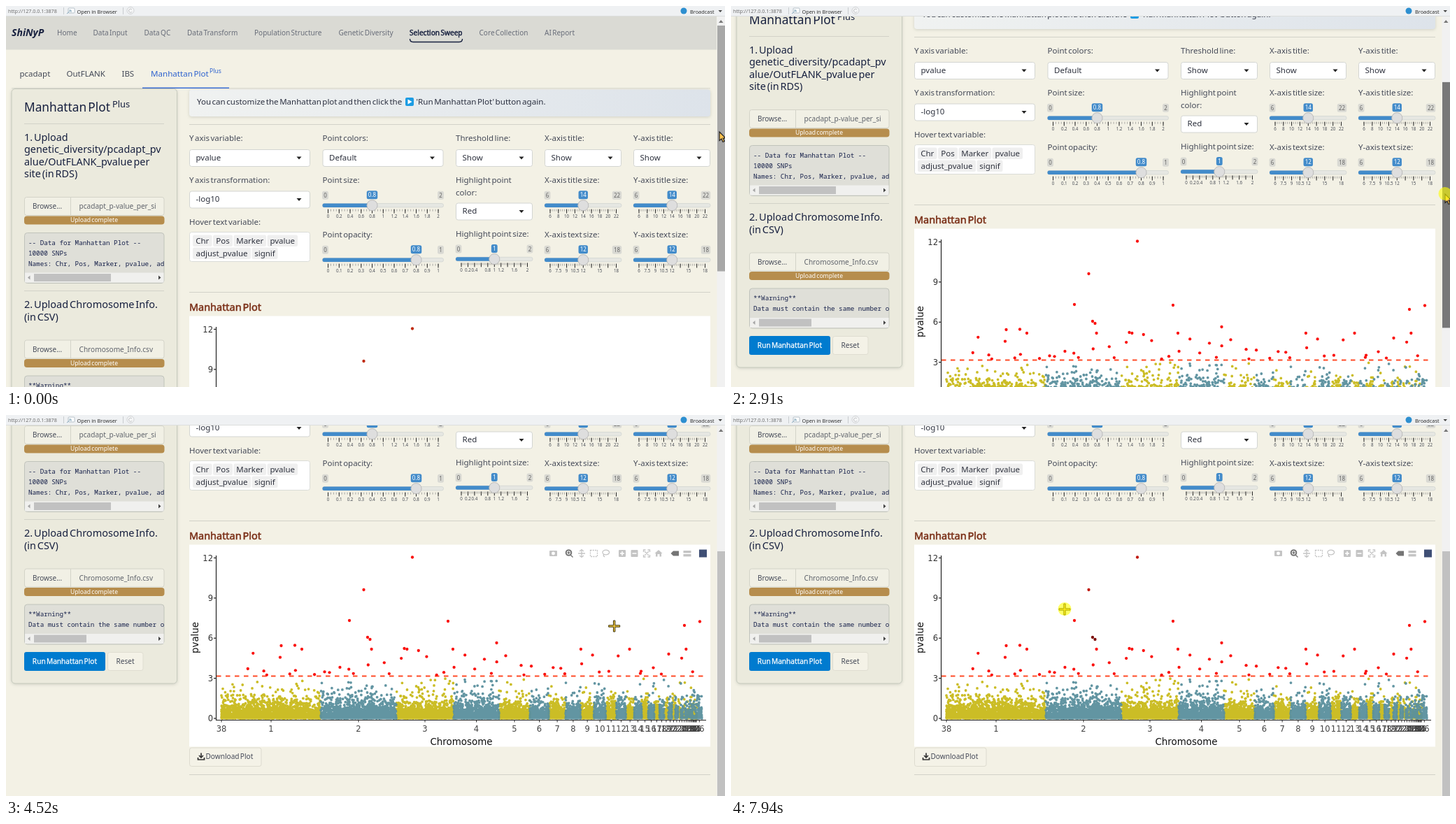
An HTML page that plays this animation: 1028 by 545 pixels, repeating every 8 s.

```html
<!DOCTYPE html>
<html lang="en">
<head>
<meta charset="utf-8">
<title>Manhattan Plot</title>
<style>
html, body { margin: 0; width: 100%; height: 100%; overflow: hidden; background: #f3f1e5; }
svg { display: block; }
text { font-family: "Noto Sans", sans-serif; word-spacing: -.13em; }
.mono { font-family: "Noto Sans Mono", monospace; word-spacing: 0; }
.plot { font-family: "DejaVu Sans", sans-serif; word-spacing: 0; }
.tip { font-family: "Liberation Sans", sans-serif; word-spacing: 0; }
.bar { font-family: "Open Sans", sans-serif; word-spacing: 0; }
.shadow { filter: drop-shadow(0 1px 2px rgba(70, 80, 70, .2)); }
</style>
</head>
<body>
<svg id="stage" width="1028" height="545" viewBox="0 0 1028 545"></svg>
<script>
const INK = '#454a58', DARK = '#17203f', BLUE = '#428bca', LINE = '#d2d2c8';
const YELLOW = '#c9ba1b', TEAL = '#5a909e';

const attrs = o => Object.entries(o).map(([k, v]) => ` ${k}="${v}"`).join('');
const text = (x, y, str, size = 11.5, fill = INK, more = {}) =>
  `<text${attrs({ x, y, 'font-size': size, fill, ...more })}>${str}</text>`;
const rect = (x, y, width, height, fill, more = {}) =>
  `<rect${attrs({ x, y, width, height, fill, ...more })}/>`;
const path = (d, stroke, width = 1, more = {}) =>
  `<path${attrs({ d, stroke, 'stroke-width': width, fill: 'none', ...more })}/>`;
const circle = (cx, cy, r, more = {}) => `<circle${attrs({ cx, cy, r, ...more })}/>`;
const shape = (d, fill) => `<path d="${d}" fill="${fill}"/>`;
const rule = (x1, x2, y, color = LINE) => path(`M${x1} ${y}H${x2}`, color);
const group = (content, more = {}) => `<g${attrs(more)}>${content}</g>`;
const heavy = (color, width) => ({ stroke: color, 'stroke-width': width });
const list = (n, fn) => Array.from({ length: n }, (_, i) => fn(i));
const MID = { 'text-anchor': 'middle' };

let seed = 7;
const random = () => (seed = seed * 16807 % 2147483647) / 2147483647;

function titleBar() {
  return rect(0, 0, 1028, 14.5, '#eff1f3') + rule(0, 1028, 14.5, '#dcdedd') +
    text(3, 10, 'http://127.0.0.1:3878', 7.2, '#666', { class: 'bar' }) +
    path('M82.5 2V12M167.5 2V12', '#c9cccf') +
    rect(89, 3, 9, 7, '#fff', { stroke: '#a5b3bd', 'stroke-width': .8, rx: 1 }) +
    path('M87 11L93 6M93 6H90M93 6V9', '#86a9bd') +
    text(101.5, 10.5, 'Open in Browser', 7.35, '#222', { class: 'bar' }) +
    circle(178, 6.5, 5, { fill: '#f5f6f7', stroke: '#d0d2d4' }) + path('M180 5A2.6 2.6 0 1 0 180.4 8', '#c2c4c6') +
    circle(969, 7, 4.5, { fill: '#2d8fd0' }) +
    text(978, 10.5, 'Broadcast', 7.4, '#222', { class: 'bar' }) +
    shape('M1018.5 6H1024L1021.2 9Z', '#444');
}

function navigation() {
  const items = [[73, 'Home'], [124.5, 'Data Input'], [197.5, 'Data QC'], [259, 'Data Transform'],
    [355, 'Population Structure'], [475.5, 'Genetic Diversity'], [676.5, 'Core Collection'], [770, 'AI Report']];
  return rect(0, 0, 1016, 62.5, '#dadad4') +
    text(8, 43, 'ShiNyP', 14, DARK, { 'font-weight': 700, 'font-style': 'italic' }) +
    items.map(([x, s]) => text(x, 41.5, s, 10.05, '#686d79')).join('') +
    text(577, 41.5, 'Selection Sweep', 10.15, DARK, heavy(DARK, .45)) +
    path('M577.5 47Q577.5 51.5 582 51.5H648Q652.5 51.5 652.5 47', DARK, 1.4) +
    rule(8, 1007, 117.8, '#d9d9d0') +
    text(19.5, 100.5, 'pcadapt') + text(86.5, 100.5, 'OutFLANK') + text(165.5, 100.5, 'IBS') +
    text(207, 100.5, 'Manhattan Plot', 11.6, '#2f63cf') + text(291, 96, 'Plus', 8.6, '#2f63cf') +
    path('M195 117.3H319', '#3a6fd8', 1.6);
}

function upload(y, file) {
  return rect(26.5, y, 199.5, 26, '#f1f0e5', { rx: 3, stroke: '#d3d3c8' }) +
    path(`M92.5 ${y}V${y + 26}`, '#d3d3c8') +
    text(38, y + 16.8, 'Browse...', 9.9) + text(104.5, y + 16.8, file, 10.1, '#60646c') +
    rect(26, y + 27, 200.5, 12, '#b68d4d', { rx: 4 }) +
    text(126, y + 35.7, 'Upload complete', 8.65, '#fff', MID);
}

function output(y, height, lines, thumb) {
  const bar = y + height - 15;
  return rect(26.5, y, 199.5, height, '#dfdfd8', { rx: 4, stroke: '#c0c3bb' }) +
    group(lines.map((s, i) => text(32, y + 17 + i * 15.2, s, 9.25, '#16204a', { class: 'mono' })).join(''),
      { 'clip-path': 'url(#side)' }) +
    rect(27, bar, 198.5, 14, '#f0f0ee') + rect(40, bar + 1.5, thumb, 11, '#c1c1c1') +
    shape(`M34.5 ${bar + 4}v6l-3.5 -3Z`, '#a5a5a5') + shape(`M218 ${bar + 4}v6l3.5 -3Z`, '#444');
}

function sidebar() {
  const title = ['1. Upload', 'genetic_diversity/pcadapt_pv', 'alue/OutFLANK_pvalue per', 'site (in RDS)'];
  return rect(8, 118.5, 236.5, 523.5, '#ebeadd', { rx: 5, stroke: '#c6c9bd', class: 'shadow' }) +
    text(26, 151, 'Manhattan Plot', 17.25, DARK) + text(152, 144.5, 'Plus', 12.9, DARK) +
    rule(26, 226, 168.5) +
    title.map((s, i) => text(26, 193 + i * 17.4, s, 14.4, DARK)).join('') +
    upload(273.5, 'pcadapt_p-value_per_si') +
    output(324.5, 72, ['-- Data for Manhattan Plot --', '10000 SNPs', 'Names: Chr, Pos, Marker, pvalue, adjust'], 110) +
    rule(26, 226, 407.5) +
    text(26, 432, '2. Upload Chromosome Info.', 14.5, DARK) + text(26, 449.5, '(in CSV)', 14.4, DARK) +
    upload(478, 'Chromosome_Info.csv') +
    output(529, 57, ['**Warning**', 'Data must contain the same number of'], 75) +
    rect(26, 597, 116, 27, '#007bcf', { rx: 3 }) +
    text(84, 614, 'Run Manhattan Plot', 10.15, '#fff', { ...MID, ...heavy('#fff', .25) }) +
    rect(145.5, 597.5, 50.5, 26, '#f4f2e7', { rx: 3, stroke: '#dfddd1' }) +
    text(170.5, 614, 'Reset', 10.1, INK, MID);
}

function select(x, y, width, value) {
  return rect(x + .5, y + .5, width - 1, 24, '#fff', { rx: 3, stroke: '#d3d5d2' }) +
    text(x + 9.5, y + 15.5, value, 11.5, '#2d313d') +
    shape(`M${x + width - 19.5} ${y + 10.5}h7l-3.5 4Z`, '#222');
}

function badge(center, y, str, fill, color) {
  const width = [...str].reduce((w, c) => w + (c === '.' ? 2.1 : 4.6), 4.2);
  return rect(center - width / 2, y, width, 12, fill, { rx: 2.5 }) + text(center, y + 9, str, 8, color, MID);
}

// y is the middle of the track; hidden lists labels the widget drops
function slider(x, y, width, min, max, value, steps, hidden = []) {
  const left = x + 8, span = width - 15.5;
  const at = v => left + span * (v - min) / (max - min);
  const ticks = (n, h) => list(n + 1, i => `M${(left + span * i / n).toFixed(1)} ${y + 5.5}v${h}`).join('');
  const labels = list(steps + 1, i => {
    const v = +(min + (max - min) * i / steps).toFixed(1);
    return hidden.includes(v) ? '' : text(at(v), y + 18, v, 6.2, '#4a4e57', MID);
  }).join('');
  return badge(x + 4, y - 20.5, String(min), '#d9d9d3', '#666') +
    badge(x + width - (max > 9 ? 6.5 : 4), y - 20.5, String(max), '#d9d9d3', '#666') +
    rect(x, y - 2.7, width, 5.4, '#e6e7e2', { rx: 2.5, stroke: '#cfd3d0', 'stroke-width': .7 }) +
    rect(x, y - 2.8, at(value) - x, 5.6, BLUE, { rx: 2.5 }) +
    path(ticks(steps * 4, 3), '#777', .6) + path(ticks(steps, 5.8), '#222') +
    labels + badge(at(value), y - 21, String(value), BLUE, '#fff') +
    circle(at(value), y, 7.6, { fill: '#dedede', stroke: '#b0b0b0', 'stroke-width': .8 });
}

function controls() {
  const chip = (x, y, width, s) => rect(x, y, width, 16.5, '#efefef', { rx: 2.5 }) +
    text(x + width / 2, y + 12.2, s, 11.5, '#2d313d', MID);
  const axis = (x, name) =>
    text(x, 193, name + '-axis title:') + select(x, 205, 110, 'Show') +
    text(x, 253, name + '-axis title size:') + slider(x, 285.2, 110, 6, 22, 14, 8) +
    text(x, 331, name + '-axis text size:') + slider(x, 363.2, 110, 6, 18, 12, 8, [13.5, 16.5]);
  return rect(262, 119.5, 745, 38.5, 'url(#info)', { rx: 4, class: 'shadow' }) +
    text(273, 141, 'You can customize the Manhattan plot and then click the', 11.55, '#2b3040') +
    rect(571, 131, 12, 12, '#1c9ce3', { rx: 2 }) + shape('M574.5 133.5V140.5L580.5 137Z', '#fff') +
    text(586.5, 141, "'Run Manhattan Plot' button again.", 11.65, '#2b3040') +
    rule(262, 1007, 169.5) +
    text(262, 193, 'Y axis variable:') + select(262, 205, 173, 'pvalue') +
    text(262, 253, 'Y axis transformation:') + select(262, 264.5, 173, '-log10') +
    text(262, 312.5, 'Hover text variable:') +
    rect(262.5, 323.5, 172, 42, '#fff', { rx: 3, stroke: '#dadcd8' }) +
    chip(267, 327.5, 27.5, 'Chr') + chip(296, 327.5, 28, 'Pos') + chip(325.5, 327.5, 46.5, 'Marker') +
    chip(373.5, 327.5, 43.5, 'pvalue') + chip(267, 345.5, 83, 'adjust_pvalue') + chip(351.5, 345.5, 37, 'signif') +
    text(452.5, 193, 'Point colors:') + select(452.5, 205, 173, 'Default') +
    text(452.5, 253, 'Point size:') + slider(452.5, 285.2, 173, 0, 2, .8, 10) +
    text(452.5, 331, 'Point opacity:') + slider(452.5, 363.2, 173, 0, 1, .8, 10) +
    text(643, 193, 'Threshold line:') + select(643, 205, 110, 'Show') +
    text(643, 253, 'Highlight point') + text(643, 270.5, 'color:') + select(643, 281.5, 110, 'Red') +
    text(643, 330, 'Highlight point size:') + slider(643, 362, 110, 0, 2, 1, 10, [.6, 1.4, 1.8]) +
    axis(770, 'X') + axis(897, 'Y') + rule(262, 1007, 409.5);
}

const valueY = v => 436 - 19.13 * v;

// Chromosome borders: the big ones, then a steady decay towards the right end
const EDGES = [308, 450, 558, 640, 705, 749];
while (EDGES.length < 36) EDGES.push(995 - (995 - EDGES.at(-1)) * .89);
EDGES.push(995);

function cloud() {
  const dots = ['', ''];
  for (let i = 0; i < 10000; i++) {
    const x = 308 + random() * 686.9;
    const v = Math.min(-Math.log10(random()), 3.1 - random() * .5);
    const chr = EDGES.findIndex(e => e > x) - 1;
    dots[chr % 2] += `M${x.toFixed(1)} ${valueY(v).toFixed(1)}h0`;
  }
  return [YELLOW, TEAL].map((c, i) =>
    path(dots[i], c, 3.8, { 'stroke-linecap': 'round', 'stroke-opacity': .95 })).join('');
}

// The tallest peaks stand out; the rest thin out above the threshold
function hits() {
  const peaks = [[581, 205.5], [511.5, 252], [517, 320], [520.5, 323], [491, 296], [632, 297],
    [970, 303], [992, 297.5], [701.5, 328], [393.5, 332], [413, 331.5], [569.5, 336]];
  const rest = list(54, i => [336 + 657 * (i + random()) / 54, Math.max(337, 374 + 14 * Math.log(random()))]);
  return [...peaks, ...rest].map(([x, y]) => circle(x, y, 2.15, { class: 'hit' })).join('');
}

function modebar() {
  const pale = '#c4c4c4', mid = '#757575', y = 198;
  const box = x => rect(x - 5, y - 5, 10, 10, pale, { rx: 1 });
  return rect(777, y - 4, 11, 8, pale, { rx: 1 }) + circle(782.5, y, 2.4, { fill: '#fff' }) +
    circle(804.5, y - 1, 3.8, { fill: '#fff', ...heavy(mid, 2) }) +
    path(`M807 ${y + 2}l3.5 3.5M802.5 ${y - 1}h4M804.5 ${y - 3}v4`, mid, 1.4) +
    path(`M818 ${y}h10M823 ${y - 5}v10M820 ${y - 3}l3-2.5l3 2.5M820 ${y + 3}l3 2.5l3-2.5`, pale, 1.3) +
    rect(835.5, y - 4.5, 10, 9, 'none', { stroke: pale, 'stroke-width': 1.3, 'stroke-dasharray': '2 1.3' }) +
    path(`M853 ${y - 1.5}a4.8 3.4 0 1 1 9.6 0a4.8 3.4 0 1 1 -9.6 0M855 ${y + 1}q-2 2 1 4`, pale, 1.3) +
    box(881) + path(`M878 ${y}h6M881 ${y - 3}v6`, '#fff', 1.5) + box(898.5) + path(`M895.5 ${y}h6`, '#fff', 1.5) +
    path(`M911.5 ${y - 2}v-3h3m3 0h3v3m0 4v3h-3m-3 0h-3v-3M913 ${y - 3}l6 6m0 -6l-6 6`, pale, 1.3) +
    shape(`M927.5 ${y}l5.5 -5l5.5 5h-1.5v4.5h-2.5v-3.5h-3v3.5h-2.5v-4.5Z`, pale) +
    shape(`M950.5 ${y}l3.5 -3.5h8v7h-8Z`, mid) +
    rect(968.5, y - 4, 11, 3.4, pale) + rect(968.5, y + 1, 11, 3.4, pale) +
    rect(991, y - 5.5, 11, 11, '#3f4f75');
}

function tooltip(x, y, top, lines) {
  return shape(`M${x} ${y}l6.5 -5v10Z`, '#f00') + rect(x + 6, top, 125.5, 76, '#f00') +
    lines.map((s, i) => text(x + 8, top + 10.6 + i * 12.25, s, 9.42, '#fff', { class: 'tip' })).join('');
}

function plot() {
  const yAxis = [0, 3, 6, 9, 12].map(v => path(`M297 ${valueY(v)}h3.5`, '#222', 1.2) +
    text(296, valueY(v) + 4.2, v, 11.5, '#333', { class: 'plot', 'text-anchor': 'end' })).join('');
  const middles = EDGES.slice(1).map((e, i) => (e + EDGES[i]) / 2);
  const names = [308, ...middles].map((x, i) => path(`M${x} 438.5v3`, '#222') +
    text(x, 455, i || 38, 11.5, '#444', { class: 'plot', ...MID })).join('');
  return text(262, 180, 'Manhattan Plot', 14.45, '#7b3018', heavy('#7b3018', .55)) +
    rect(262, 187.5, 745, 289, '#fff') + cloud() +
    path('M300.5 203V438.5H1001', '#222', 1.2) + yAxis + names +
    path('M301 375.5H1000', '#ff4a26', 1.8, { 'stroke-dasharray': '6.5 6.5' }) +
    group(hits(), { id: 'hits' }) +
    text(651, 474, 'Chromosome', 13.45, '#111', { class: 'plot', ...MID }) +
    text(0, 0, 'pvalue', 13.4, '#111', { class: 'plot', ...MID, transform: 'translate(275 320.5) rotate(-90)' }) +
    group(modebar(), { id: 'modebar', transform: 'translate(0 2)' }) +
    group(tooltip(581, 205.5, 187.5, ['Chr:\u00a0 3', 'Pos:\u00a0 30244672', 'Marker: 3:30244672', 'pvalue: 8.714356e-13',
      'adjust_pvalue: 8.714356e-09', 'signif: Yes']), { id: 'tip1' }) +
    group(tooltip(511.5, 252, 214, ['Chr:\u00a0 2', 'Pos:\u00a0 21390411', 'Marker: 2:21390411', 'pvalue: 2.335146e-10',
      'adjust_pvalue: 1.167573e-06', 'signif: Yes']), { id: 'tip2' }) +
    rect(262.5, 478, 102.5, 26.5, '#f4f2e7', { rx: 3, stroke: '#dddbcf' }) +
    path('M279 485.5v6M276 489l3 3l3-3M274.5 492v3h9v-3', '#333', 1.7) +
    text(285.5, 494.2, 'Download Plot', 10.1) + rule(262, 1007, 516.5);
}

const plus = 'M-1.2 -8H1.2V-1.2H8V1.2H1.2V8H-1.2V1.2H-8V-1.2H-1.2Z';
const arrow = 'M0 0V12.5L3 10L5 14.5L7.2 13.5L5.2 9.2H9Z';
document.getElementById('stage').innerHTML =
  `<defs><clipPath id="view"><rect y="15" width="1016" height="530"/></clipPath>
  <clipPath id="side"><rect x="27" width="199" height="700"/></clipPath>
  <linearGradient id="info"><stop stop-color="#f0f2f1"/><stop offset="1" stop-color="#dde3ea"/></linearGradient></defs>` +
  rect(0, 0, 1028, 545, '#f3f1e5') +
  group(group(navigation() + sidebar() + controls() + group(plot(), { transform: 'translate(0 256)' }), { id: 'page' }),
    { 'clip-path': 'url(#view)' }) +
  rect(1016.5, 14, 12, 531, '#f1f1f1') + shape('M1019 24H1025.5L1022.2 20Z', '#777') +
  rect(1017, 28, 11, 351.5, '#a8a8a8', { id: 'thumb' }) + titleBar() +
  group(path(arrow, '#222', 1.2, { id: 'arrow', fill: '#ffc552' }) +
    path(plus, '#3d3510', 1, { id: 'cross', fill: '#f0c63c' }) +
    circle(0, -.5, 9.5, { id: 'disc', fill: '#ff0', 'fill-opacity': .6 }), { id: 'pointer' });

// Moves are [first step, last step, ...where it ends]; a step is about a tenth of a second
const SCROLL = [[14, 17, 19.3], [17, 21, 125], [21, 27, 256], [27, 28, 258]];
const POINTER = [[-1, 0, 1026, 180], [14, 17, 1026, 197], [17, 21, 1021, 269], [21, 27, 1015, 347],
  [34, 43, 579, 212], [50, 56, 512.5, 252], [58, 61, 519, 323], [61, 65, 479.5, 278],
  [67, 69, 465.5, 268], [69, 71, 477, 278]];

function follow(from, moves, k) {
  return moves.reduce((pos, [begin, end, ...to]) => {
    const f = Math.min(1, Math.max(0, (k - begin) / (end - begin)));
    return pos.map((p, i) => p + (to[i] - p) * f);
  }, from);
}

const el = Object.fromEntries([...document.querySelectorAll('[id]')].map(e => [e.id, e]));
const dots = document.querySelectorAll('.hit');
const show = (e, on) => e.setAttribute('display', on ? 'inline' : 'none');
let last;

function draw(time) {
  const k = Math.floor((time % 8000 - 775) / 100.65);
  if (k !== last) {
    last = k;
    const [scroll] = follow([0], SCROLL, k), [x, y] = follow([1020, 180], POINTER, k);
    const pressed = k >= 13 && k < 31;
    el.page.setAttribute('transform', `translate(0 ${-scroll})`);
    el.thumb.setAttribute('y', 28 + scroll * .647);
    el.thumb.setAttribute('fill', pressed ? '#787878' : k < 13 ? '#a8a8a8' : '#c1c1c1');
    el.pointer.setAttribute('transform', `translate(${x} ${y})`);
    show(el.disc, (k >= 12 && k < 31) || k >= 71);
    show(el.arrow, k < 35);
    show(el.cross, k >= 35);
    show(el.modebar, k >= 35);
    show(el.tip1, k >= 43 && k <= 50);
    show(el.tip2, k >= 56 && k < 60);
    el.hits.setAttribute('fill', scroll < 30 ? '#bf2a10' : '#fa0f0c');
    // Points the pointer has passed stay darker
    [43, 56, 61, 61].forEach((from, i) => {
      dots[i].style.fill = k >= from ? (i < 2 ? '#c01a10' : '#7d0d08') : '';
    });
  }
  requestAnimationFrame(now => draw(now - start));
}
const start = performance.now();
draw(0);
</script>
</body>
</html>
```
